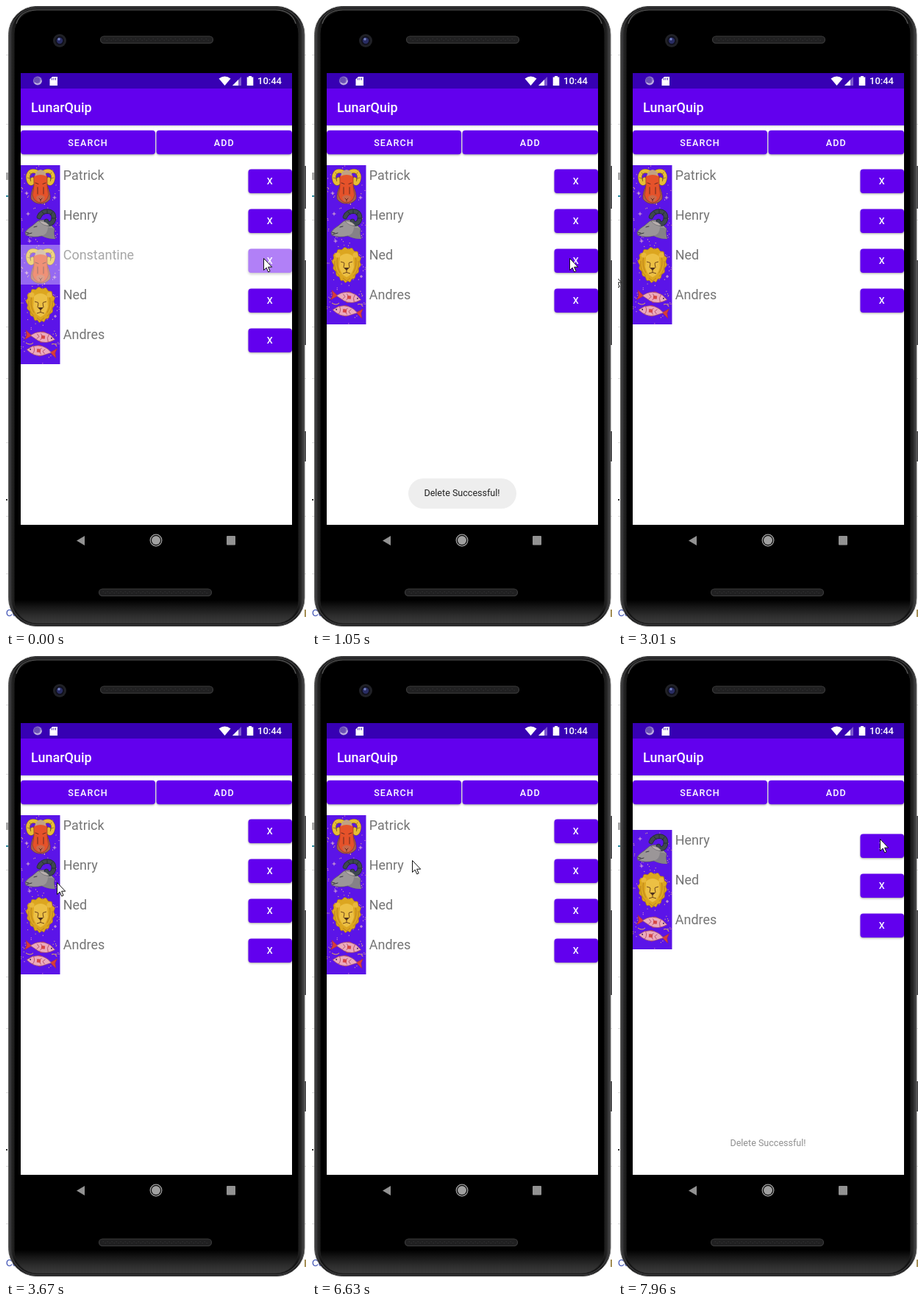
Animation of 408x844 px, one loop 8000 ms. Source, as an HTML page with a canvas:

```html
<!DOCTYPE html>
<html lang="en">
<head>
<meta charset="utf-8">
<title>LunarQuip</title>
<style>
html, body { margin: 0; width: 100%; height: 100%; overflow: hidden; background: #fff; }
canvas { display: block; width: 408px; height: 844px; }
</style>
</head>
<body>
<canvas id="stage"></canvas>
<script>
const W = 408, H = 844, LOOP = 8000;
const VIOLET = '#6200ee', FONT = 'Roboto, "Noto Sans", sans-serif';
const canvas = document.getElementById('stage');
const scale = window.devicePixelRatio || 1;
canvas.width = W * scale;
canvas.height = H * scale;
let g = canvas.getContext('2d');

function rect(x, y, w, h, color) {
  g.fillStyle = color;
  g.fillRect(x, y, w, h);
}
function round(x, y, w, h, r, color, line) {
  g.beginPath();
  g.roundRect(x, y, w, h, r);
  if (color) { g.fillStyle = color; g.fill(); }
  if (line) { g.strokeStyle = line; g.stroke(); }
}
function oval(x, y, rx, ry, color) {
  g.beginPath();
  g.ellipse(x, y, rx, ry, 0, 0, 7);
  g.fillStyle = color;
  g.fill();
}
function shape(d, color, line, width = 1) {
  const p = new Path2D(d);
  if (color) { g.fillStyle = color; g.fill(p); }
  if (line) { g.strokeStyle = line; g.lineWidth = width; g.stroke(p); }
}
function text(s, x, y, size, color, weight = 400, align = 'left', gap = 0) {
  g.font = `${weight} ${size}px ${FONT}`;
  g.letterSpacing = gap + 'px';
  g.textAlign = align;
  g.fillStyle = color;
  g.fillText(s, x, y);
}
function gradient(x1, y1, x2, y2, ...stops) {
  const fill = g.createLinearGradient(x1, y1, x2, y2);
  for (const [at, color] of stops) fill.addColorStop(at, color);
  return fill;
}
function faded(alpha, draw) {
  g.save();
  g.globalAlpha = alpha;
  draw();
  g.restore();
}
function button(label, x, y, w, lift = 1) {
  g.save();
  g.shadowColor = 'rgba(0,0,0,.32)';
  g.shadowBlur = 2.4 * lift * scale;
  g.shadowOffsetY = 1.3 * lift * scale;
  round(x, y, w, 32.5, 4, VIOLET);
  g.restore();
  text(label, x + w / 2, y + 20.9, 12.56, '#fff', 500, 'center', 1.12);
}

// Zodiac pictures, each on a 54 px tile
function sparkle(seed) {
  for (let i = 0; i < 26; i++) {
    seed = (seed * 16807) % 2147483647;
    const a = seed / 2147483647 * 6.283;
    const r = 21 + seed % 7;
    oval(27 + Math.cos(a) * r, 27 + Math.sin(a) * r, .6, .6, i % 3 ? '#e3bd79' : '#f0a9bd');
  }
}
function star(x, y) {
  shape(`M${x - 2} ${y}h4M${x} ${y - 2}v4`, null, '#f2c9c9', .8);
}
const pictures = {
  ram() {
    sparkle(11);
    g.lineCap = 'round';
    shape('M18 28Q13 38 14 46Q20 53 27 52Q34 53 40 46Q41 38 36 28Z', '#a8614c', '#6f3436', .7);
    const horns = 'M22 9C11 5 8 14 11 22C13 27 18 25 16 19M32 9C43 5 46 14 43 22C41 27 36 25 38 19';
    shape(horns, null, '#7a5a20', 5.8);
    shape(horns, null, '#e6bd35', 4.7);
    shape('M9 17l4 1M12 10l3 4M45 17l-4 1M42 10l-3 4', null, '#8d6a25', .8);
    shape('M18 15Q27 8 36 15L36 26Q36 33 38 40Q36 50 27 51Q18 50 16 40Q18 33 18 26Z', '#e5522a', '#8f3527', .7);
    shape('M19 15Q20 7 27 6Q34 7 35 15Q27 11 19 15Z', '#c1a283');
    shape('M21 43Q27 38 33 43Q32 50 27 50Q22 50 21 43Z', '#c9694a');
    shape('M20 24l4 1.5M34 24l-4 1.5M25 45l2 2l2-2M27 47v2M23 30v9M31 30v9', null, '#54251f', .9);
    star(46, 44); star(8, 38);
  },
  goat() {
    sparkle(29);
    shape('M6 37Q9 32 16 28L23 22Q30 18 37 23L46 32Q44 39 47 46Q37 46 29 42Q17 45 7 41Z', '#9b9698', '#55525c', .7);
    shape('M29 42Q37 39 37 30L46 32Q44 39 47 46Q37 46 29 42Z', '#858187');
    g.lineCap = 'round';
    const horn = 'M25 16C29 6 45 6 45 17C45 26 36 28 35 22';
    shape(horn, null, '#252c39', 6.6);
    shape(horn, null, '#3e4850', 4.8);
    shape('M29 9l3 4M36 7v4M43 10l-3 4M47 18h-5', null, '#1e2530', .8);
    shape('M25 22Q34 21 39 28Q31 29 25 22Z', '#bab1ae', '#55525c', .5);
    shape('M18 30l4-1M7 37l4 1M8 40l7-2', null, '#34323b', 1);
    star(10, 12); star(12, 49);
  },
  lion() {
    sparkle(47);
    g.beginPath();
    for (let i = 0; i <= 90; i++) {
      const a = i / 90 * Math.PI * 2, r = 1 + .05 * Math.cos(a * 15);
      g.lineTo(27 + Math.cos(a) * 18.5 * r * (1 - .22 * Math.sin(a)), 27.5 + Math.sin(a) * 23 * r);
    }
    g.fillStyle = '#dca620';
    g.fill();
    g.strokeStyle = '#a87018';
    g.lineWidth = .7;
    g.stroke();
    shape('M11 22Q9 34 18 43M43 22Q45 34 36 43M15 15Q12 28 18 38M39 15Q42 28 36 38M22 45l5 4l5-4', null, '#b67b1a', .8);
    oval(15, 14, 3.5, 3.5, '#e9b83b');
    oval(39, 14, 3.5, 3.5, '#e9b83b');
    shape('M18 16Q27 8 36 16L37 30Q34 42 27 44Q20 42 17 30Z', '#ecc044');
    shape('M23 31h8l-4 4Z', '#4d311e');
    shape('M19 23l5 1.5M35 23l-5 1.5M24 25l-1 6M30 25l1 6M27 34v4M22 39Q27 36 32 39', null, '#6e451c', 1);
    star(47, 43);
  },
  fish() {
    sparkle(73);
    const one = (x, y, dir, turn) => {
      g.save();
      g.translate(x, y);
      g.scale(dir, 1.1);
      g.rotate(turn);
      shape('M-13 0L-22-6L-20 0L-22 6Z', '#d93c38', '#8f2d4c', .5);
      shape('M-3-5Q2-9 6-5ZM-2 5Q0 9 4 5Z', '#d93c38');
      shape('M-15 0Q-3-10 12-4L19 1Q7 9-4 5Z', '#eba9bb', '#9a476b', .7);
      shape('M10-4Q7 0 10 5M-6-3l3 3l-3 3M-1-4l3 4l-3 4', null, '#b04a68', .8);
      shape('M0-2h5v4h-5Z', '#d54747');
      oval(14, 0, .9, .9, '#3b264d');
      g.restore();
    };
    one(28, 17, 1, .12);
    one(27, 36, -1, -.14);
    shape('M7 25Q13 29 17 25M42 27Q47 25 49 30', null, '#e8b54e', 1);
  }
};
function tile(kind, y) {
  g.save();
  g.beginPath();
  g.rect(20, y, 53.5, 54);
  g.clip();
  g.translate(20, y);
  rect(0, 0, 54, 54, '#5b14e8');
  pictures[kind]();
  g.restore();
}
function row([name, kind], y, lift) {
  tile(kind, y);
  text(name, 77.8, y + 19.7, 17.95, '#757575');
  button('X', 329.5, y + 5.5, 59.5, lift);
}
// White veil over a row being removed, with the touch ripple on its button
function veil(y) {
  rect(20, y, 369, 54, 'rgba(255,255,255,.36)');
  round(329.5, y + 5.5, 59.5, 32.5, 4, 'rgba(255,255,255,.22)');
}

function desktop() {
  rect(0, 0, W, H, '#fff');
  for (const y of [66, 160, 290, 435, 505, 592, 692, 770]) rect(0, y, W, 1, '#dcdcdc');
  rect(0, 226, 10, 10, '#a9a9a9');
  rect(0, 257, 4, 2, '#2b8ca0');
  rect(0, 669, 2, 2, '#333');
  g.font = '12px "Liberation Sans", sans-serif';
  g.letterSpacing = '0px';
  g.textAlign = 'left';
  g.fillStyle = '#3347b0';
  g.fillText('Co', 0, 828);
  rect(406, 819, 2, 10, '#a58f55');
}
function body() {
  for (const [y, h] of [[217, 58], [345, 115], [577, 41]]) rect(403, y, 5, h, '#4a4a4c');
  const side = ['#4e4e4e', '#262626', '#121212'];
  const rim = gradient(3, 0, 406, 0,
    [0, side[0]], [.012, side[1]], [.025, side[2]], [.975, side[2]], [.988, side[1]], [1, side[0]]);
  g.lineWidth = 1;
  round(3.5, .5, 402.5, 841, 38, rim, '#5a5a5a');
  g.lineWidth = 1.6;
  round(6, 2.5, 397.5, 837, 36, null, '#3a3a3c');
  g.lineWidth = 1;
  const chin = gradient(0, 806, 0, 838, [0, '#000'], [.3, '#161616'], [.65, '#2c2c2c'], [1, '#3d3d3d']);
  round(11, 6, 387, 832, 31, chin, '#202020');
  shape('M14 24Q19 6 42 5H366Q389 6 394 24', null, '#5a5a5a', 1.2);
  for (const [x, y] of [[128.5, 41], [126.5, 791]]) {
    round(x, y, 153, 9.5, 4.7, '#202021', '#3a3a3b');
    for (let i = 0; i < 48; i++) rect(x + 5 + i * 3, y + 3 + i % 2 * 2, 1.4, 1.4, '#2f2f30');
  }
  oval(73, 47, 9, 9, '#202126');
  oval(73, 47, 6, 6, '#10101d');
  oval(73, 47, 4.2, 4.2, '#292d63');
  oval(72, 45, 1.7, 1.7, '#7784c4');
}
function chrome() {
  rect(20, 91, 369, 613, '#fff');
  rect(20, 162, 369, 3, gradient(0, 162, 0, 165, [0, 'rgba(0,0,0,.16)'], [1, 'rgba(0,0,0,0)']));
  rect(20, 91, 369, 21, '#3700b3');
  rect(20, 112, 369, 50, VIOLET);
  text('LunarQuip', 34, 144.3, 17.95, '#fff', 500);

  oval(43, 101.5, 6, 6, '#8f78c9');
  oval(42, 100.5, 4, 4, '#6a4fb5');
  shape('M39 104A5 5 0 0 0 48 101', null, '#d0c4ec', 1.2);
  shape('M63 96H70V108H59.5V99.5Z', '#fff');
  shape('M62.5 98v2.5M65 97.5v3M67.5 97.5v3', null, '#3700b3', .9);
  shape('M289.5 98.5Q297.5 92.5 305.5 98.5L297.5 108Z', '#fff');
  shape('M320 96V108H308Z', 'rgba(255,255,255,.35)');
  shape('M316 100V108H308Z', '#fff');
  shape('M330 95h4v1.5h2.3V108h-8.6V96.5H330Z', '#fff');
  text('10:44', 342, 106.3, 13, '#fff', 500);

  button('SEARCH', 20, 168.7, 183);
  button('ADD', 204.5, 168.7, 184.5);

  shape('M107 719V732L96 725.5Z', '#929292');
  oval(204, 725, 6, 6, '#a0a0a0');
  g.beginPath();
  g.arc(204, 725, 7.8, 0, 7);
  g.strokeStyle = '#a0a0a0';
  g.lineWidth = 1.3;
  g.stroke();
  round(300, 719, 12, 12.5, 1, '#929292');
}
function toast(alpha) {
  if (!alpha) return;
  faded(Math.max(0, alpha * 2 - 1), () => round(131, 641, 147, 41, 20.5, '#eee'));
  faded(alpha, () => text('Delete Successful!', 204, 665, 12.56, '#222', 400, 'center'));
}
function cursor([x, y]) {
  g.save();
  g.translate(x + .5, y + .5);
  g.lineJoin = 'round';
  shape('M0 0V16L3.7 12.6L6.2 18.4L8.6 17.4L6.1 11.7H11.2Z', '#fff', '#111', 1);
  g.restore();
}

// The pointer jumps at these times: ms, x, y
const track = [
  [0, 350, 342], [1560, 348, 321], [1710, 339, 293], [1830, 333, 268], [1950, 353, 249],
  [2100, 354, 245], [2220, 354, 243], [2640, 58, 255], [2760, -40, 300], [3010, -7, 363],
  [3130, 20, 396], [3290, 37, 416], [3430, 48, 381], [3550, 59, 342], [3670, 69, 307],
  [3790, 78, 285], [3910, 85, 273], [4060, 104, 270], [4180, 121, 272], [4450, 124, 275],
  [4570, 126, 277], [6630, 136, 277], [6760, 135, 245], [7020, 250, 239], [7140, 355, 248],
  [7390, 356, 248]
];
const toastTrack = [
  [0, 0], [150, .5], [290, .85], [410, 1], [2100, .8], [2220, .45], [2360, 0], [7960, .5]
];
const at = (list, t) => list.findLast(k => k[0] <= t).slice(1);

const people = [
  ['Patrick', 'ram'], ['Henry', 'goat'], ['Constantine', 'ram'], ['Ned', 'lion'], ['Andres', 'fish']
];
// When each removed row fades, vanishes, and the rows below have settled
const removals = { 2: [0, 150, 290], 0: [7810, 7960, 8100] };

function list(t) {
  let y = 216;
  people.forEach((p, i) => {
    const [fade, gone, settled] = removals[i] || [LOOP, LOOP, LOOP];
    if (t >= gone) {
      if (t < settled) y += 20;
      return;
    }
    row(p, y, t >= fade ? 1.5 : 1);
    if (t >= fade) veil(y);
    y += 54;
  });
}

function layer(draw) {
  const c = document.createElement('canvas'), main = g;
  c.width = canvas.width;
  c.height = canvas.height;
  g = c.getContext('2d');
  g.scale(scale, scale);
  draw();
  g = main;
  return c;
}
const backdrop = layer(() => { desktop(); body(); chrome(); });

const start = performance.now();
function frame() {
  const t = (performance.now() - start) % LOOP;
  g.setTransform(1, 0, 0, 1, 0, 0);
  g.drawImage(backdrop, 0, 0);
  g.scale(scale, scale);
  list(t);
  toast(at(toastTrack, t)[0]);
  cursor(at(track, t));
  requestAnimationFrame(frame);
}
frame();
</script>
</body>
</html>
```
